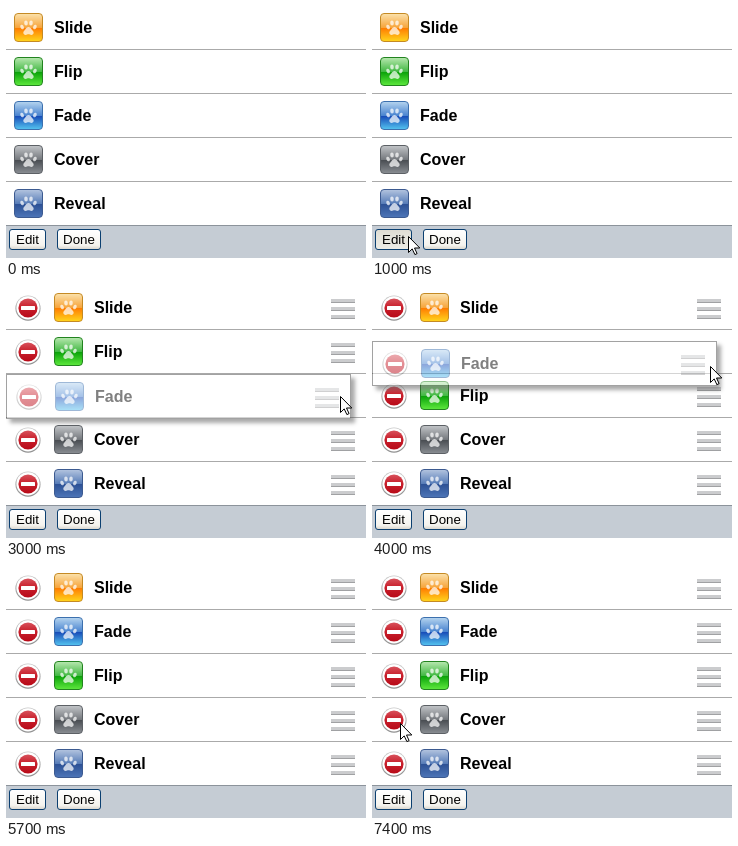
Write an HTML page that moves like this. It is 360 px wide and 252 px high and loops after 8 s.

```html
<!DOCTYPE html>
<html lang="en">
<head>
<meta charset="utf-8">
<title>Editable list</title>
<style>
html, body { margin: 0; width: 100%; height: 100%; overflow: hidden; background: #fff; }
#stage { position: relative; width: 360px; height: 252px; overflow: hidden; font-family: "Liberation Sans", Arial, sans-serif; }
#stage * { box-sizing: border-box; }
svg { position: absolute; overflow: visible; }
.line { position: absolute; left: 0; width: 360px; height: 1px; background: #aaa; }
.row { position: absolute; left: 0; width: 360px; height: 44px; border: 0 solid #444; }
.main { position: absolute; left: 8px; top: 7px; }
.icon { position: absolute; width: 29px; height: 29px; border: 1px solid var(--edge); border-radius: 4px;
  background: linear-gradient(var(--a), var(--b) 50%, var(--c) 51%, var(--d)); }
.icon svg { left: 5px; top: 6px; width: 17px; height: 16px; }
.label { position: absolute; left: 40px; top: 5px; font: bold 16px/19px "Liberation Sans", Arial, sans-serif; color: #000; }
.minus { left: 9px; top: 9px; width: 26px; height: 26px; }
.grip { right: 11px; top: 13px; width: 24px; height: 20px; }
.bar { position: absolute; left: 0; top: 219px; width: 360px; height: 33px; background: #c5ccd4; border-top: 1px solid #8c939b; }
.btn { position: absolute; top: 3px; height: 21px; border: 1px solid #0b3f70; border-radius: 3px;
  background: linear-gradient(#fff, #f4f3ee 80%, #dcd8cf); font-size: 13.33px; line-height: 19px; text-align: center; color: #000; }
#cursor { left: 0; top: 0; width: 13px; height: 20px; }

/* every change is a hard cut */
.main, .minus, .grip, .btn.edit, #flip, #fade, #cursor { animation: 8s step-end infinite; }
.main { animation-name: indent; }
.minus, .grip { animation-name: reveal; }
.btn.edit { animation-name: hover; }
#flip { animation-name: swap; }
#fade { animation-name: drag; }
#cursor { animation-name: point; }
@keyframes indent { 0% { transform: none; } 25%, 100% { transform: translateX(40px); } }
@keyframes reveal { 0% { visibility: hidden; } 25%, 100% { visibility: visible; } }
@keyframes hover {
  0%, 25%, 100% { background: linear-gradient(#fff, #f4f3ee 80%, #dcd8cf); }
  12.5% { background: linear-gradient(#dedcd3, #e4e3db 30%, #ecebe5); }
}
@keyframes swap { 0% { top: 44px; } 50%, 100% { top: 88px; } }
@keyframes drag {
  0% { top: 88px; width: 360px; height: 44px; border-width: 0; opacity: 1; background: none; box-shadow: none; }
  37.5% { top: 88px; width: 345px; height: 45px; border-width: 1px; opacity: .5; background: #fff; box-shadow: 4px 4px 4px #555; }
  50% { top: 55px; width: 345px; height: 45px; border-width: 1px; opacity: .5; background: #fff; box-shadow: 4px 4px 4px #555; }
  56.25%, 100% { top: 44px; width: 360px; height: 44px; border-width: 0; opacity: 1; background: none; box-shadow: none; }
}
@keyframes point {
  0%, 25%, 56.25% { transform: translate(-40px, 0); }
  12.5% { transform: translate(36px, 230px); }
  37.5% { transform: translate(334px, 110px); }
  50% { transform: translate(338px, 80px); }
  81.25%, 100% { transform: translate(28px, 157px); }
}
</style>
</head>
<body>
<div id="stage">
  <svg width="0" height="0">
    <defs>
      <linearGradient id="red" x2="0" y2="1">
        <stop offset="0" stop-color="#d8525c"/>
        <stop offset=".45" stop-color="#c8202c"/>
        <stop offset="1" stop-color="#b80a18"/>
      </linearGradient>
      <linearGradient id="ring" x2="0" y2="1">
        <stop offset="0" stop-color="#c8c8c8"/>
        <stop offset="1" stop-color="#8f8f8f"/>
      </linearGradient>
      <symbol id="paw" viewBox="0 0 17 16">
        <g fill="#fff" fill-opacity=".72">
          <ellipse cx="2.1" cy="7" rx="1.7" ry="2.3" transform="rotate(-20 2.1 7)"/>
          <ellipse cx="6" cy="3" rx="1.8" ry="2.6" transform="rotate(-6 6 3)"/>
          <ellipse cx="11" cy="3" rx="1.8" ry="2.6" transform="rotate(6 11 3)"/>
          <ellipse cx="14.9" cy="7" rx="1.7" ry="2.3" transform="rotate(20 14.9 7)"/>
          <path d="M8.5 7C6.2 7 5.7 9.4 4.4 10.6C2.6 12.2 3.2 15 5.6 14.9C7 14.9 7.4 14.2 8.5 14.2S10 14.9 11.4 14.9C13.8 15 14.4 12.2 12.6 10.6C11.3 9.4 10.8 7 8.5 7Z"/>
        </g>
      </symbol>
      <symbol id="minus" viewBox="0 0 26 26">
        <circle cx="13" cy="13.2" r="12.6" fill="url(#ring)"/>
        <circle cx="13" cy="12.8" r="11.6" fill="#fff"/>
        <circle cx="13" cy="13" r="9.6" fill="url(#red)"/>
        <rect x="6" y="11" width="14" height="4" rx=".6" fill="#fff"/>
      </symbol>
      <symbol id="grip" viewBox="0 0 24 20">
        <path fill="#cbccce" d="M0 0h24v4H0zM0 8h24v4H0zM0 16h24v4H0z"/>
        <path fill="#a0a1a3" d="M0 3h24v1H0zM0 11h24v1H0zM0 19h24v1H0z"/>
      </symbol>
    </defs>
  </svg>
  <div id="list"></div>
  <div class="bar">
    <div class="btn edit" style="left:3px;width:37px">Edit</div>
    <div class="btn" style="left:51px;width:44px">Done</div>
  </div>
  <svg id="cursor" viewBox="0 0 13 20">
    <path d="M.5.5V16.5L4.2 12.9L6.9 18.6L9.1 17.6L6.5 12H11.8Z" fill="#fff" stroke="#000"/>
  </svg>
</div>
<script>
// label, edge, then four gradient colours from top to bottom
const items = [
  ["Slide", "#c58a24", "#fbe0a8", "#f7a53c", "#ff7900", "#ffd21c"],
  ["Flip", "#22831f", "#b4e6ac", "#43b944", "#08a008", "#5be63c"],
  ["Fade", "#3c70ae", "#b2d2ee", "#4a84d0", "#1648b6", "#52c0ee"],
  ["Cover", "#5c6065", "#c0c3c6", "#75797e", "#474b50", "#888c91"],
  ["Reveal", "#3c5a90", "#b0c2de", "#587db8", "#2c5094", "#4c74b6"]
];
const use = (id, cls) => `<svg class="${cls}"><use href="#${id}"/></svg>`;
const row = ([name, edge, a, b, c, d], i) => `
  <div class="row" id="${name.toLowerCase()}" style="top:${i * 44}px">
    ${use("minus", "minus")}
    <div class="main">
      <div class="icon" style="--edge:${edge};--a:${a};--b:${b};--c:${c};--d:${d}">${use("paw", "")}</div>
      <span class="label">${name}</span>
    </div>
    ${use("grip", "grip")}
  </div>`;
const lines = items.map((_, i) => `<div class="line" style="top:${i * 44 + 43}px"></div>`);
document.getElementById("list").innerHTML = lines.join("") + items.map(row).join("");
</script>
</body>
</html>
```
